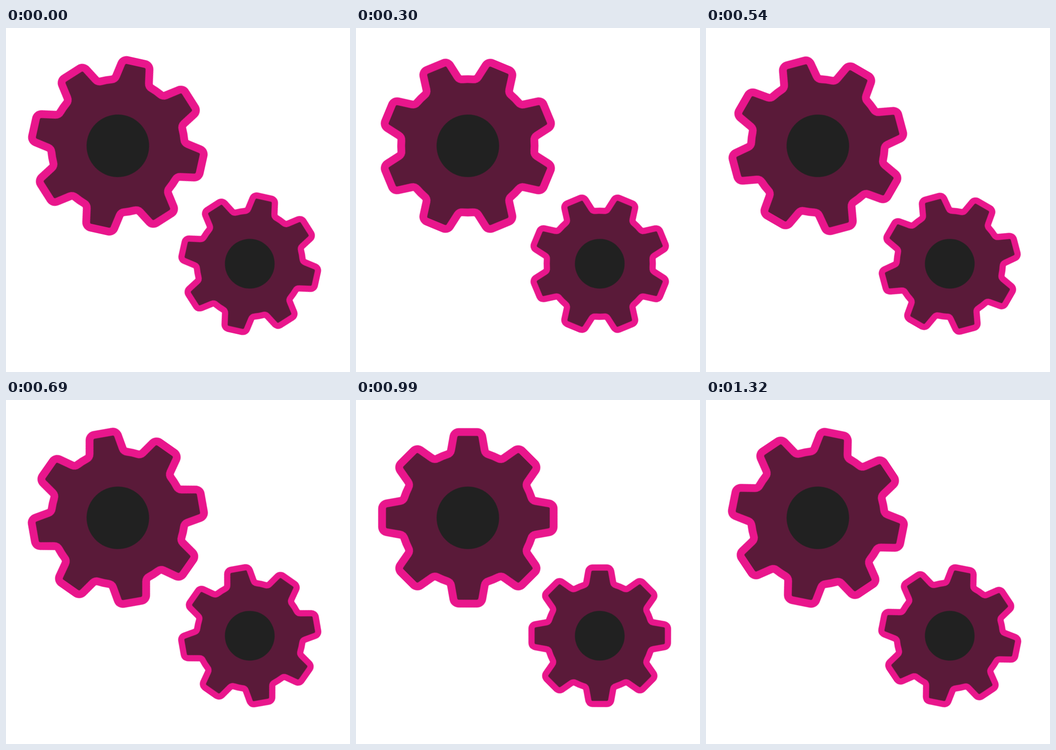
Animation, 748 px wide and 748 px high, one loop 1350 ms. Source, as an HTML page:

```html
<!DOCTYPE html>
<html lang="en">
<head>
<meta charset="utf-8">
<title>Gears</title>
<style>
  html, body { margin: 0; width: 100%; height: 100%; overflow: hidden; background: #fff; }
  svg { display: block; width: 100%; height: 100%; }
  .teeth { fill: #5a1a39; stroke: #e9168c; stroke-width: 17; stroke-linejoin: round; }
  .hub { fill: #212121; }

  /* 36 poses of 1.25deg: nine groups of four, the first pose of each held twice as long */
  .turn { animation: turn 1350ms steps(9) infinite; }
  .tick { animation: tick 150ms step-end infinite; }
  @keyframes turn {
    from { transform: rotate(12.5deg); }
    to { transform: rotate(57.5deg); }
  }
  @keyframes tick {
    0% { transform: rotate(0deg); }
    40% { transform: rotate(1.25deg); }
    60% { transform: rotate(2.5deg); }
    80%, 100% { transform: rotate(3.75deg); }
  }
</style>
</head>
<body>
<svg viewBox="0 0 748 748">
  <defs>
    <g id="gear">
      <path class="teeth" id="teeth"/>
      <circle class="hub" r="68"/>
    </g>
  </defs>
  <g transform="translate(243.2 256.2)">
    <g class="turn"><g class="tick"><use href="#gear"/></g></g>
  </g>
  <g transform="translate(530 512.6) scale(.795)">
    <g class="turn"><g class="tick"><use href="#gear"/></g></g>
  </g>
</svg>
<script>
  const TEETH = 8, ROOT = 145, TIP_R = 12, FOOT_R = 11;

  // Right half of an upright tooth, from tip to root
  const half = [[19.6, -186.6], [31.3, -176.8], [36.6, -146.9], [44.6, -138]];
  const left = half.map(([x, y]) => [-x, y]).reverse();
  const outline = [...left, ...half];

  const arc = (r, sweep) => `A${r} ${r} 0 0 ${sweep} `;
  const joins = [
    arc(ROOT, 1), arc(FOOT_R, 0), 'L', arc(TIP_R, 1),
    'L', arc(TIP_R, 1), 'L', arc(FOOT_R, 0)
  ];

  function rotate([x, y], a) {
    const c = Math.cos(a), s = Math.sin(a);
    return `${(x * c - y * s).toFixed(2)} ${(x * s + y * c).toFixed(2)}`;
  }

  let d = '';
  for (let i = 0; i < TEETH; i++) {
    const a = i * 2 * Math.PI / TEETH;
    outline.forEach((p, k) => {
      d += (i || k ? joins[k] : 'M') + rotate(p, a);
    });
  }
  d += joins[0] + rotate(outline[0], 0) + 'Z';
  document.getElementById('teeth').setAttribute('d', d);
</script>
</body>
</html>
```
